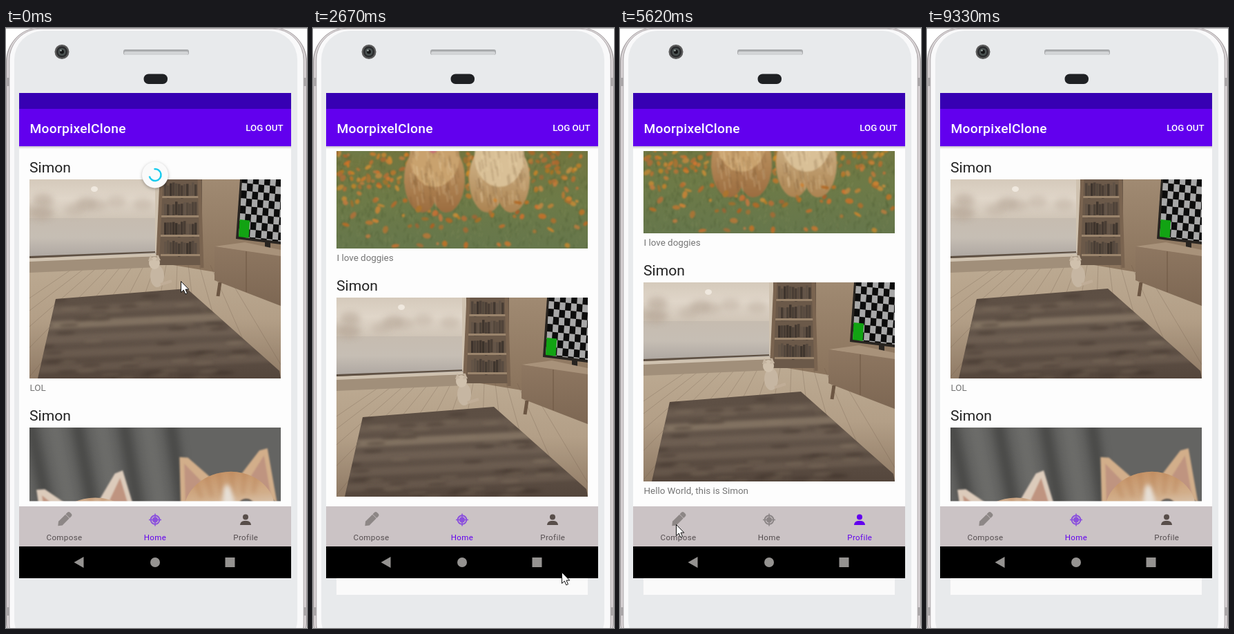
Write an HTML page with a canvas that moves like this. It is 436 px wide and 868 px high and loops after 9640 ms.

```html
<!DOCTYPE html>
<html lang="en">
<head>
<meta charset="utf-8">
<title>Photo feed demo</title>
<style>
html, body { margin: 0; width: 100%; height: 100%; overflow: hidden; background: #fff; }
canvas { display: block; width: 100vw; height: 100vh; }
</style>
</head>
<body>
<canvas id="stage" width="436" height="868"></canvas>
<script>
const g = document.getElementById('stage').getContext('2d');
const LOOP = 9640, STEP = 125, TAU = Math.PI * 2;
const PURPLE = '#6200ee', SOFT_PURPLE = '#8b50dd';
const USER = 'Simon';
const OPEN_PROFILE = 3415, OPEN_COMPOSE = 5990, OPEN_HOME = 8820;

// Pointer gestures: start, end, tip at the end.
const MOVES = [
  [0, 630, 246, 793], [630, 1140, 227, 680],
  [1930, 2170, 228, 90], [2170, 2670, 360, 787], [2670, 2910, 345, 712],
  [3280, 3820, 272, 199], [3820, 4320, 300, 560],
  [4345, 4720, 325, 98], [4720, 5470, 140, 730], [5470, 5620, 81, 718],
  [5860, 6410, 194, 588], [6670, 6960, 210, 543], [7135, 7540, 221, 703], [7825, 8260, 221, 708]
];

function pointerAt(t) {
  let x = 253, y = 366;
  for (const [a, b, toX, toY] of MOVES) {
    if (t < a) break;
    const n = Math.round((b - a) / STEP);
    const p = Math.min(1, Math.floor((t - a) / (b - a) * n + 1e-6) / n);
    x += (toX - x) * p;
    y += (toY - y) * p;
  }
  return [x, y];
}

const snap = (t, anchor) => anchor + Math.floor((t - anchor) / STEP) * STEP;
const fling = (t, start, distance) => distance * (1 - Math.exp(-Math.max(0, t - start) / 165));

function scrollAt(t) {
  if (t >= OPEN_HOME) return 0;
  if (t < OPEN_PROFILE) return fling(snap(t, 2170), 2059, 929);
  const s = snap(t, 3820);
  return fling(s, 3784, 560) + fling(s, 4500, 369);
}

function path(c, pts) {
  c.beginPath();
  for (let i = 0; i < pts.length; i += 2) c.lineTo(pts[i], pts[i + 1]);
  c.closePath();
}
function poly(c, color, ...pts) { c.fillStyle = color; path(c, pts); c.fill(); }
function rect(c, color, x, y, w, h) { c.fillStyle = color; c.fillRect(x, y, w, h); }
function oval(c, color, x, y, rx, ry = rx, turn = 0) {
  c.fillStyle = color;
  c.beginPath();
  c.ellipse(x, y, rx, ry, turn, 0, TAU);
  c.fill();
}
function round(c, color, x, y, w, h, r) {
  c.fillStyle = color;
  c.beginPath();
  c.roundRect(x, y, w, h, r);
  c.fill();
}
function line(c, color, width, x0, y0, x1, y1) {
  c.strokeStyle = color;
  c.lineWidth = width;
  c.beginPath();
  c.moveTo(x0, y0);
  c.lineTo(x1, y1);
  c.stroke();
}
function fade(c, y0, y1, ...colors) {
  const f = c.createLinearGradient(0, y0, 0, y1);
  colors.forEach((s, i) => f.addColorStop(i / (colors.length - 1), s));
  return f;
}
function repeat(n, fn) { for (let i = 0; i < n; i++) fn(i); }
function text(s, x, y, size, color, { weight = 400, align = 'left', gap = 0 } = {}) {
  g.font = `${weight} ${size}px Roboto, sans-serif`;
  g.letterSpacing = gap + 'px';
  g.textAlign = align;
  g.fillStyle = color;
  g.fillText(s, x + (align === 'center' ? gap / 2 : 0), y);
}

const PW = 364, PH = 288;
function photo(paint) {
  const cv = document.createElement('canvas');
  cv.width = PW;
  cv.height = PH;
  let seed = 29;
  paint(cv.getContext('2d'), () => (seed = (seed * 16807) % 2147483647) / 2147483647);
  return cv;
}

const room = photo((c, rnd) => {
  rect(c, fade(c, 0, 130, '#a08a72', '#8b745d'), 0, 0, PW, PH);
  // floor
  poly(c, fade(c, 115, PH, '#bdab93', '#b39f87', '#8f7a65'), 0, 134, 184, 120, PW, 150, PW, PH, 0, PH);
  repeat(14, i => line(c, 'rgba(100,82,65,.25)', 1, 70 + i * 16, 124, i * 42 - 170, PH));
  // window
  rect(c, fade(c, 0, 56, '#d5cabb', '#e0d6c9', '#d0c5b7'), 0, 0, 184, 56);
  rect(c, fade(c, 56, 112, '#c6bcb0', '#c6beb4', '#aea7a1'), 0, 56, 184, 56);
  c.filter = 'blur(4px)';
  repeat(12, () => oval(c, 'rgba(184,170,154,.4)', rnd() * 180, 30 + rnd() * 20, 14, 9));
  c.filter = 'blur(.6px)';
  oval(c, '#efe8de', 94, 14, 5, 4);
  const sill = (color, y, h) => poly(c, color, 0, y, 186, y - 7, 186, y + h - 8, 0, y + h);
  sill('#a18f7a', 118, 17);
  sill('#cfc2b0', 114, 5);
  sill('#5e5043', 111, 3);
  rect(c, '#cfc2b0', 182, 0, 6, 106);
  // bookcase
  rect(c, '#6b5949', 188, 0, 62, 124);
  repeat(4, row => {
    const y = row * 28 - 2;
    repeat(12, i => rect(c, `hsl(27 16% ${20 + rnd() * 14}%)`, 195 + i * 4, y + 6 + rnd() * 5, 3.5, 19));
    rect(c, '#9a846c', 190, y + 26, 58, 3);
  });
  line(c, '#7a6450', 5, 191, 0, 186, 110);
  line(c, '#7a6450', 5, 246, 0, 250, 128);
  // television
  poly(c, '#282420', 305, 0, PW, 0, PW, 94, 299, 86);
  rect(c, '#282420', 341, 90, 8, 13);
  oval(c, '#282420', 345, 103, 12, 3);
  c.save();
  path(c, [308, 0, PW, 0, PW, 90, 303, 83]);
  c.clip();
  c.transform(1, .1, -.06, 1, 308, -6);
  repeat(72, i => rect(c, (i + (i >> 3)) % 2 ? '#a8a8a8' : '#0c0c0c', i % 8 * 8.2, (i >> 3) * 11, 8.2, 11));
  rect(c, '#12a313', 0, 64, 15, 28);
  c.restore();
  // cabinet
  poly(c, '#a8927a', 268, 97, 312, 91, PW, 102, PW, 112);
  poly(c, fade(c, 97, 183, '#8e7761', '#7d6753'), 268, 97, PW, 111, PW, 183, 268, 146);
  line(c, '#6c5643', 1, 314, 104, 314, 163);
  line(c, '#6c5643', 5, 276, 149, 273, 169);
  // cat
  oval(c, '#c6b6a2', 185, 140, 10, 16);
  oval(c, '#d0c1ad', 181, 121, 8, 9);
  for (const x of [175, 186]) poly(c, '#c6b6a2', x - 3, 118, x, 109, x + 4, 117);
  line(c, '#c0ad97', 4, 190, 152, 206, 147);
  // rug
  c.save();
  path(c, [38, 173, 228, 158, 362, 277, PW, PH, 12, PH]);
  c.clip();
  rect(c, fade(c, 160, PH, '#5c4e43', '#63554a', '#54463c'), 0, 150, PW, 140);
  c.filter = 'blur(2px)';
  c.rotate(-.05);
  repeat(5, i => rect(c, `rgba(150,133,114,${i === 1 ? .6 : .22})`, 0, 186 + i * 21, PW, 11));
  repeat(70, i => oval(c, i % 2 ? 'rgba(62,50,42,.4)' : 'rgba(140,122,104,.25)', rnd() * PW, 175 + rnd() * 130, 14, 2.5));
  c.restore();
});

function kitten(c, x, y, turn, fur, brow) {
  c.save();
  c.translate(x, y);
  c.rotate(turn);
  for (const side of [-1, 1]) {
    c.save();
    c.scale(side, 1);
    poly(c, fur, 20, -44, 52, -78, 64, -80, 70, 0);
    poly(c, '#bf9480', 36, -42, 58, -70, 62, -14);
    c.restore();
  }
  c.save();
  c.beginPath();
  c.ellipse(0, 4, 66, 56, 0, 0, TAU);
  c.clip();
  rect(c, fade(c, -50, 50, brow, fur, '#dfd6cc', '#d9cfc4'), -70, -60, 140, 125);
  c.filter = 'blur(3px)';
  repeat(6, i => line(c, 'rgba(180,125,82,.45)', 5, i * 20 - 50, -60, i * 15 - 38, -18));
  oval(c, '#e6dfd6', 0, 4, 9, 38);
  oval(c, '#e4dcd3', 2, 34, 36, 22);
  c.restore();
  for (const side of [-1, 1]) {
    oval(c, '#5b524b', side * 25, 0, 11.5, 10.5);
    oval(c, '#777b7c', side * 25, 0, 8.5);
    oval(c, '#1d1c1c', side * 25, 0, 6);
    oval(c, '#eee', side * 25 + 2, -3, 2);
    line(c, '#a98273', 1.4, 2, 33, 2 + side * 9, 38);
    repeat(3, i => line(c, 'rgba(245,240,235,.5)', .7, side * 20, 30 + i * 4, side * 78, 20 + i * 16));
  }
  poly(c, '#bb7464', -5, 20, 9, 20, 2, 29);
  c.restore();
}

const kittens = photo((c, rnd) => {
  rect(c, '#646462', 0, 0, PW, PH);
  c.filter = 'blur(7px)';
  repeat(7, i => line(c, i % 2 ? 'rgba(118,118,114,.6)' : 'rgba(56,56,55,.7)', 16, i * 34, -10, 40 + i * 32, 180));
  poly(c, '#393938', -20, 140, 60, 190, 150, 310, -20, 310);
  c.filter = 'blur(1px)';
  // bodies
  c.fillStyle = fade(c, 130, PH, '#dfd8cd', '#dad1c5', '#cbbfb2');
  c.beginPath();
  c.moveTo(65, 185);
  c.bezierCurveTo(115, 145, 180, 130, 240, 140);
  c.lineTo(PW, 150);
  c.lineTo(PW, PH);
  c.lineTo(135, PH);
  c.quadraticCurveTo(85, 250, 65, 185);
  c.fill();
  c.filter = 'blur(8px)';
  line(c, 'rgba(150,134,122,.45)', 14, 245, 165, 200, 270);
  c.filter = 'blur(1px)';
  for (const x of [238, 310]) {
    oval(c, '#d6cbbf', x, 268, 32, 18);
    repeat(3, i => line(c, '#a99b8f', 1.5, x - 12 + i * 12, 274, x - 10 + i * 12, 286));
  }
  kitten(c, 90, 154, -.22, '#dccbbb', '#d0ac8b');
  kitten(c, 289, 116, -.1, '#d2ae8a', '#c7966a');
});

function puppy(c, rnd, x, y, turn, light, dark) {
  for (const side of [-1, 1]) oval(c, fade(c, 130, 235, light, dark), x + side * 19, 190, 25, 46, side * .05);
  oval(c, light, x, 155, 36, 44);
  repeat(90, i => {
    const fx = x - 36 + rnd() * 72, fy = 135 + rnd() * 80;
    line(c, i % 2 ? 'rgba(110,78,45,.22)' : 'rgba(240,215,175,.25)', 2, fx, fy, fx + 2, fy + 14);
  });
  c.save();
  c.translate(x, y);
  c.rotate(turn);
  oval(c, light, 0, 0, 32, 32);
  for (const side of [-1, 1]) {
    oval(c, dark, side * 32, 10, 9, 20, -side * .3);
    oval(c, '#33261d', side * 13, -3, 3);
  }
  oval(c, light, 0, 16, 21, 16);
  oval(c, '#573a2d', 0, 24, 13, 8);
  oval(c, '#c66e77', 0, 33, 8, 12);
  oval(c, '#2b211b', 0, 11, 7, 5);
  c.restore();
}

const puppies = photo((c, rnd) => {
  rect(c, fade(c, 0, PH, '#638159', '#557349', '#72753f', '#6d7a47', '#66774c'), 0, 0, PW, PH);
  c.filter = 'blur(9px)';
  repeat(24, i => oval(c, i % 2 ? 'rgba(120,145,100,.3)' : 'rgba(62,90,52,.35)', rnd() * PW, rnd() * 140, 30, 15));
  c.filter = 'blur(.8px)';
  repeat(800, i => {
    const x = rnd() * PW, y = 155 + rnd() * 133;
    line(c, i % 2 ? 'rgba(70,86,46,.5)' : 'rgba(140,148,98,.4)', 1, x, y, x + rnd() * 5 - 2, y - 6);
  });
  const bloom = (y, h, n) => repeat(n, () =>
    oval(c, `hsl(${24 + rnd() * 12} ${50 + rnd() * 20}% ${40 + rnd() * 12}% / .85)`, rnd() * PW, y + rnd() * h, 2 + rnd() * 4, 2 + rnd() * 2, rnd() * 3));
  bloom(147, 55, 170);
  bloom(195, 90, 65);
  puppy(c, rnd, 142, 105, .05, '#c9a26e', '#9c6d40');
  puppy(c, rnd, 236, 92, -.35, '#d9c097', '#ac8452');
  bloom(218, 30, 22);
});

const FEED = [
  [room, 'LOL'], [kittens, 'I love kitties'], [puppies, 'I love doggies'],
  [room, 'Hello World, this is ' + USER]
];

function phone() {
  rect(g, '#fff', 0, 0, 436, 868);
  ['#aaa5a7', '#e6e1e3', '#b9b4b6', '#f9f9fa'].forEach((color, i) => {
    const inset = i * 1.8;
    round(g, color, inset, inset / 2 - 1, 436 - inset * 2, 910 - inset, 50 - inset);
  });
  round(g, '#e8eaec', 12, 4, 410, 894, 42);
  line(g, '#b0acae', 1, 0, .5, 436, .5);
  for (const y of [72, 838]) {
    for (const x of [0, 431]) rect(g, '#aaa6a8', x, y, 5, 12);
  }
  round(g, '#a9abad', 170, 31, 95, 8, 3);
  round(g, '#d2d4d6', 171, 34, 93, 5, 2);
  round(g, '#1f2124', 199.5, 66.5, 34.5, 14.5, 7);
  ['#5a5a5a', '#2b2c2e', '#4b5352', '#151617'].forEach((color, i) => oval(g, color, 81, 34.5, 10.5 - i * 2.5));
  oval(g, '#a9b3b0', 79.5, 32.5, 1.2);
}

function feed(offset) {
  g.save();
  g.beginPath();
  g.rect(19, 178, 394, 506.5);
  g.clip();
  FEED.forEach(([pic, caption], i) => {
    const y = Math.round(219 + 359 * i - offset);
    text(USER, 34, y - 10, 21.1, '#222');
    g.drawImage(pic, 34, y);
    text(caption, 34.5, y + PH + 18, 13.4, '#757575');
  });
  g.restore();
}

function button(label, y) {
  g.save();
  g.shadowColor = 'rgba(0,0,0,.4)';
  g.shadowBlur = 3;
  g.shadowOffsetY = 1.5;
  round(g, PURPLE, 19, y, 394, 35, 4);
  g.restore();
  text(label, 216, y + 23, 13.4, '#fff', { weight: 500, align: 'center', gap: 1.2 });
}

function compose() {
  text('Description....', 216, 210, 17.2, '#a3a3a3', { align: 'center' });
  rect(g, '#a9a9a9', 26, 219, 380, 1.4);
  button('TAKE PICTURE', 238);
  button('SUBMIT', 476.5);
}

function pencil(color) {
  g.save();
  g.translate(84.5, 711);
  g.rotate(-Math.PI / 4);
  poly(g, color, -13, 0, -8, -4, 6, -4, 6, 4, -8, 4);
  round(g, color, 5, -4, 8, 8, 3);
  line(g, '#cbc3c5', .8, 6.5, -4, 6.5, 4);
  g.restore();
}

function target(color) {
  g.strokeStyle = color;
  g.lineWidth = 2;
  g.beginPath();
  g.arc(216, 711.5, 6.3, 0, TAU);
  g.stroke();
  oval(g, color, 216, 711.5, 4);
  line(g, color, 1.6, 207, 711.5, 225, 711.5);
  line(g, color, 1.6, 216, 702.5, 216, 720.5);
}

function person(color) {
  oval(g, color, 347, 707.5, 4);
  round(g, color, 339, 713, 16, 6, [6, 6, 0, 0]);
}

function bars(tab) {
  rect(g, '#3700b3', 19, 94, 394, 23);
  rect(g, PURPLE, 19, 117, 394, 54);
  rect(g, fade(g, 171, 175, 'rgba(60,40,80,.28)', 'rgba(60,40,80,0)'), 19, 171, 394, 4);
  text('MoorpixelClone', 34.5, 151.5, 19.2, '#fff', { weight: 500, gap: .3 });
  text('LOG OUT', 401.5, 149, 13.3, '#fff', { weight: 500, align: 'right' });

  rect(g, '#cbc3c5', 19, 692, 394, 58);
  pencil(tab === 'Compose' ? SOFT_PURPLE : '#8d8786');
  target(tab === 'Home' ? SOFT_PURPLE : '#8b8586');
  person(tab === 'Profile' ? PURPLE : '#584e4a');
  ['Compose', 'Home', 'Profile'].forEach((name, i) =>
    text(name, 84.3 + i * 131.4, 740.5, 11.5, tab === name ? PURPLE : '#544d4f', { align: 'center', gap: .4 }));

  rect(g, '#000', 19, 750, 394, 46);
  poly(g, '#959391', 98.5, 773, 112.5, 765, 112.5, 781);
  oval(g, '#959391', 216, 773, 7);
  rect(g, '#959391', 317.5, 766, 14, 14);
}

function spinner(t) {
  const size = Math.min(1, 1 - (t - 1290) / 360);
  if (size <= 0) return;
  g.save();
  g.translate(216, 212.5);
  g.scale(size, size);
  g.shadowColor = 'rgba(0,0,0,.28)';
  g.shadowBlur = 4;
  g.shadowOffsetY = 1.5;
  oval(g, '#fafafa', 0, 0, 19);
  g.shadowColor = 'transparent';
  g.rotate(t / 1333 * TAU);
  g.strokeStyle = '#18cbee';
  g.lineWidth = 2.5;
  g.beginPath();
  g.arc(0, 0, 8.5, -1.75, 2.9);
  g.stroke();
  g.restore();
}

function pointer(x, y) {
  g.save();
  g.translate(x + .5, y + .5);
  path(g, [0, 0, 0, 16, 3.8, 12.6, 6.3, 18.3, 9, 17.2, 6.5, 11.6, 11.3, 11.6]);
  g.fillStyle = '#fff';
  g.fill();
  g.strokeStyle = '#111';
  g.lineWidth = 1;
  g.stroke();
  g.restore();
}

function draw() {
  const t = (performance.now() - start) % LOOP;
  const tab = t < OPEN_PROFILE || t >= OPEN_HOME ? 'Home' : t < OPEN_COMPOSE ? 'Profile' : 'Compose';
  phone();
  rect(g, '#fdfdfd', 19, 171, 394, 521);
  if (t >= 2290) rect(g, '#fafafa', 34, 796, 364, 24);
  if (tab === 'Compose') compose();
  else feed(scrollAt(t));
  bars(tab);
  spinner(snap(t, 0));
  if (t < OPEN_HOME) pointer(...pointerAt(t));
  requestAnimationFrame(draw);
}

const start = performance.now();
draw();
</script>
</body>
</html>
```
